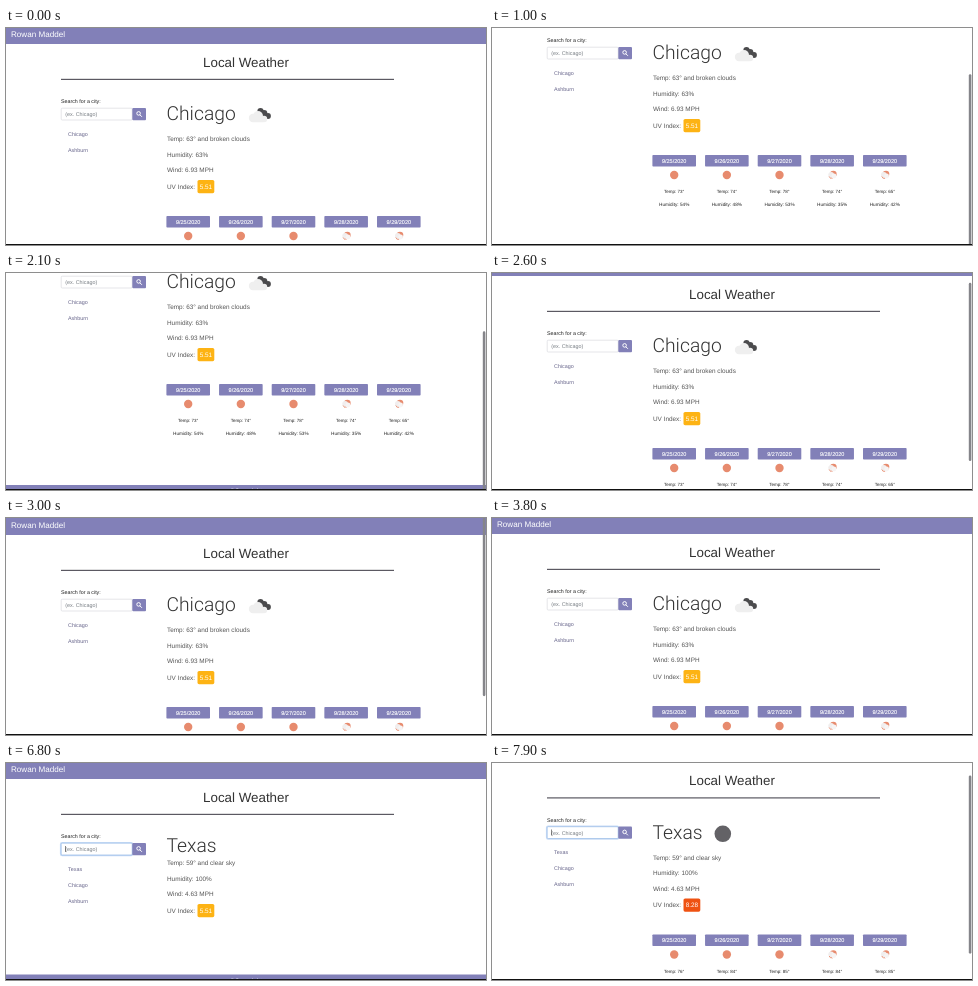
An HTML page for the animation above (8000 ms loop, 480 px wide and 217 px high).

```html
<!DOCTYPE html>
<html lang="en">
<head>
<meta charset="utf-8">
<title>Local Weather</title>
<style>
  html, body { margin: 0; width: 100%; height: 100%; overflow: hidden; background: #fff; }
  svg { display: block; width: 480px; height: 217px; }
  text { font-family: "Liberation Sans", Arial, sans-serif; text-rendering: geometricPrecision; white-space: pre; }
  .city { font-family: Roboto, "Liberation Sans", sans-serif; font-weight: 300; }
</style>
</head>
<body>
<svg id="stage" viewBox="0 0 480 217"></svg>
<script>
const LOOP = 8000, STEP = 100;
const PURPLE = '#8280b8', SUN = '#e78b6e', VIEW = 235, PAGE = 310;
const stage = document.getElementById('stage');

// [time, scroll offset]
const scrollKeys = [
  [0, 0], [700, 0], [800, 12], [900, 42], [1000, 61], [1200, 67], [1400, 67],
  [1500, 70], [1700, 76], [2000, 76], [2100, 77], [2200, 71], [2300, 56], [2500, 22],
  [2700, 4], [2800, 0], [2900, -1.2], [3000, -1], [3600, 0], [7400, 0],
  [7500, 1], [7700, 8], [7900, 16.5]
];
const typing = [[5200, 'T', 63.4], [5400, 'Te', 66.2], [5800, 'Tex', 68.9], [6000, 'Texa', 71.9], [6200, 'Texas', 74.3]];

const chicago = {
  name: 'Chicago', temp: '63° and broken clouds', humidity: 63, wind: '6.93',
  temps: [73, 74, 78, 74, 65], damp: [54, 48, 53, 35, 42]
};
const texas = {
  name: 'Texas', temp: '59° and clear sky', humidity: 100, wind: '4.63',
  temps: [76, 84, 85, 84, 85]
};

const text = (x, y, size, fill, str, extra = '') =>
  `<text x="${x}" y="${y}" font-size="${size}" fill="${fill}" ${extra}>${str}</text>`;
const rect = (x, y, w, h, fill, extra = '') =>
  `<rect x="${x}" y="${y}" width="${w}" height="${h}" fill="${fill}" ${extra}/>`;
const circle = (x, y, r, fill) => `<circle cx="${x}" cy="${y}" r="${r}" fill="${fill}"/>`;
const MID = 'text-anchor="middle"';

function scrollAt(t) {
  const i = scrollKeys.findIndex(k => k[0] > t);
  if (i < 0) return scrollKeys.at(-1)[1];
  const [t0, a] = scrollKeys[i - 1], [t1, b] = scrollKeys[i];
  return a + (b - a) * (t - t0) / (t1 - t0);
}

function cloudIcon() {
  const dark = '#4b4b4d', pale = '#efefef';
  return circle(254.5, 83, 3.1, dark) + circle(258, 85.5, 3.4, dark) + circle(262, 88, 2.9, dark) +
    circle(247, 90, 4.2, pale) + circle(252, 88, 5, pale) + circle(258, 91, 3.2, pale) +
    rect(246, 89, 13, 5.2, pale, 'rx="2"');
}

function showerIcon(x) {
  return circle(x + 1.2, 207, 3.3, SUN) + circle(x - 1, 207.8, 2.9, '#f1eeee') +
    circle(x + 1.8, 209, 2.4, '#f6f4f4') +
    `<path d="M${x - 3} 209.5l1.8 2.3M${x - .8} 210.6l.9 1.3" stroke="${SUN}" stroke-width=".9"/>`;
}

function searchBox(t) {
  const focus = t >= 4200;
  const typed = t < 6700 ? typing.filter(k => k[0] <= t).at(-1) : null;
  const caretOn = t >= 4300 && t < 4700 || t >= 5200 && t < 7100 || t >= 7500;
  const ring = focus ? rect(54.6, 79.6, 72, 13, 'none', 'rx="1.5" stroke="#c9dcf5" stroke-width="1.4"') : '';
  return text(55, 75, 5.3, '#222', 'Search for a city:') +
    ring + rect(55.2, 80.2, 71, 11.8, '#fff', `rx="1" stroke="${focus ? '#83aee2' : '#d3d5da'}" stroke-width=".6"`) +
    (typed ? text(60, 88, 5.4, '#555', typed[1]) : text(59.2, 88, 5.4, '#777d83', '(ex. Chicago)')) +
    (caretOn ? rect(typed ? typed[2] : 59.2, 83, .6, 6, '#333') : '') +
    rect(126.3, 80, 13.7, 12.3, PURPLE, 'rx="1"') +
    '<g fill="none" stroke="#fff" stroke-width="1"><circle cx="132.6" cy="85.4" r="1.8"/><path d="M133.9 86.8l2 2"/></g>';
}

function details(city, t) {
  const loading = city === texas && t < 6900;
  const newUv = city === texas && !loading;
  const y = loading ? -11 : 0;
  const line = (base, str) => text(161, base + y, 6.4, '#555', str);
  return text(160.5, loading ? 88.5 : 92, 19.3, '#333', city.name, 'class="city"') +
    (loading ? '' : city === texas ? circle(230.8, 87.3, 8.3, '#636266') : cloudIcon()) +
    line(113.3, 'Temp: ' + city.temp) + line(128.7, `Humidity: ${city.humidity}%`) +
    line(144, `Wind: ${city.wind} MPH`) + line(160.6, 'UV Index:') +
    rect(191.5, 152 + y, 16.8, 13.2, newUv ? '#ef5212' : '#fdb314', 'rx="1.6"') +
    text(199.9, 160.6 + y, 6.4, '#fff', newUv ? '8.28' : '5.51', MID) +
    (loading ? '' : forecast(city, t));
}

function forecast(city, t) {
  const icons = city === chicago || t >= 7100;
  return city.temps.map((temp, i) => {
    const x = 160.4 + i * 52.65, mid = x + 21.8;
    const icon = i < 3 ? circle(mid, 208, 4.2, SUN) : showerIcon(mid);
    return rect(x, 188, 43.6, 11.6, PURPLE, 'rx=".8"') +
      text(mid, 195.6, 5.5, '#fff', `9/${25 + i}/2020`, MID + ' stroke="#fff" stroke-width=".12"') +
      (icons ? icon : '') +
      text(mid, 226.1, 4.5, '#222', `Temp: ${temp}°`, MID) +
      (city.damp ? text(mid, 238.6, 4.7, '#222', `Humidity: ${city.damp[i]}%`, MID) : '');
  }).join('');
}

function footer(top) {
  return rect(0, top, 480, 40, PURPLE) + text(240, top + 8, 6.4, '#fff', '©Copyright', MID);
}

function scene(t) {
  const scroll = scrollAt(t), city = t < 6700 ? chicago : texas;
  const cities = city === texas ? ['Texas', 'Chicago', 'Ashburn'] : ['Chicago', 'Ashburn'];
  const barOn = t >= 800 && t < 3600 || t >= 7500;
  const ratio = VIEW / PAGE;
  return rect(0, 0, 480, 217, '#fff') + `<g transform="translate(0 ${-scroll})">` +
    rect(0, -20, 480, 36, PURPLE) + text(5, 9, 8.1, '#fff', 'Rowan Maddel') +
    text(240, 38.8, 13.35, '#333', 'Local Weather', MID) +
    rect(55, 50.8, 333, 1.2, '#5b5962') +
    searchBox(t) +
    cities.map((name, i) => text(62, 107.5 + i * 16.2, 5.4, '#66648a', name)).join('') +
    details(city, t) +
    footer(city === texas && t < 6900 ? 211.5 : 289) + '</g>' +
    (barOn ? rect(476.8, Math.max(0, scroll * ratio), 2.6, VIEW * ratio, '#85858a', 'rx="1.3"') : '') +
    rect(0, 216, 480, 1, '#111');
}

let shown = -1;
function frame() {
  const t = Math.floor(performance.now() % LOOP / STEP) * STEP;
  if (t !== shown) stage.innerHTML = scene(shown = t);
  requestAnimationFrame(frame);
}
frame();
</script>
</body>
</html>
```
